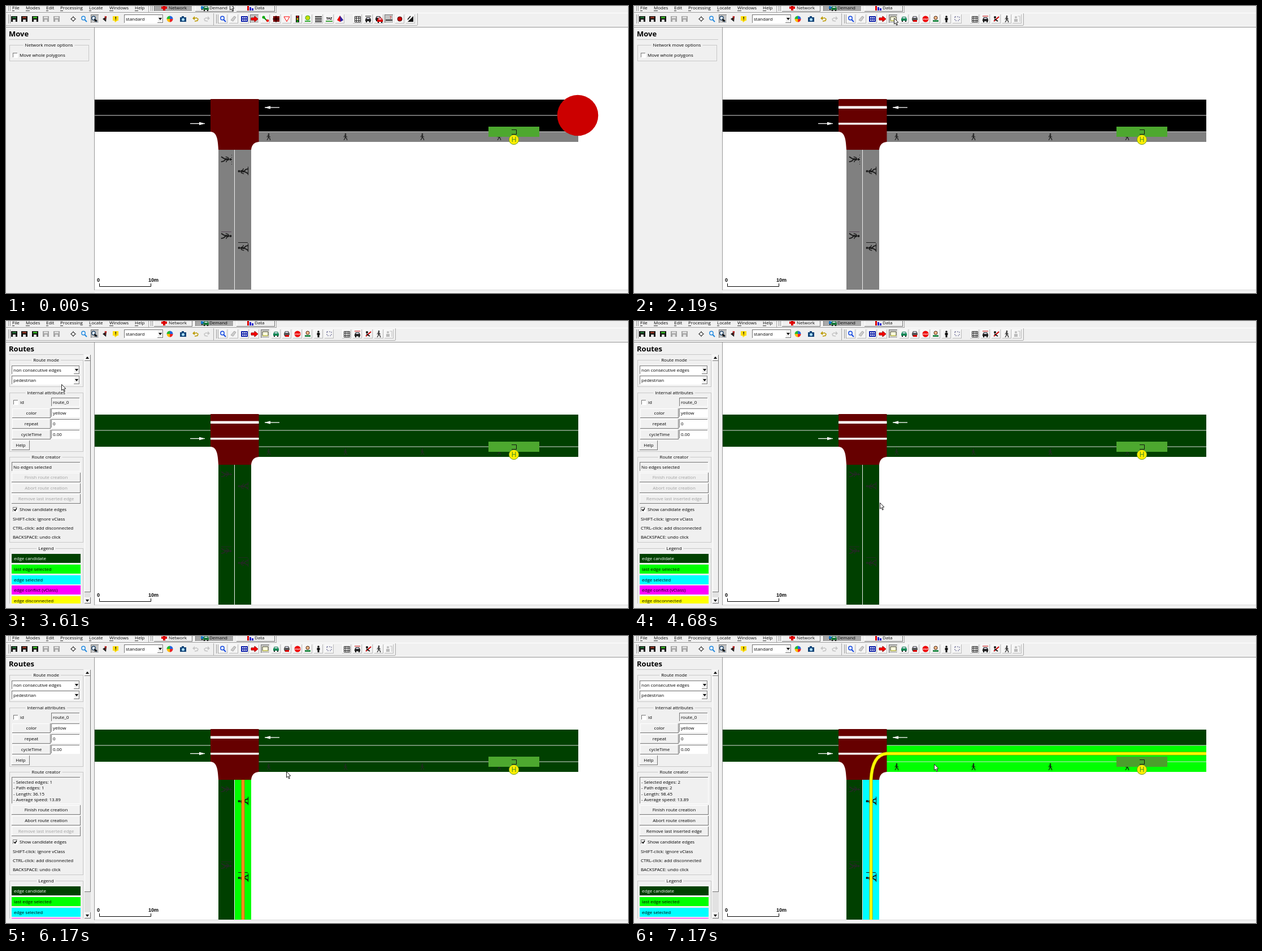
Recreate the animation shown at these times as an HTML page with a canvas. Size 1101 by 509 pixels, loop 8 s.

```html
<!DOCTYPE html>
<html lang="en">
<head>
<meta charset="utf-8">
<title>Route creation</title>
<style>
html, body { margin: 0; height: 100%; overflow: hidden; background: #f0f0f0; }
canvas { display: block; }
</style>
</head>
<body>
<canvas id="stage" width="1101" height="509"></canvas>
<script>
const g = document.getElementById('stage').getContext('2d');
const SANS = '"Open Sans", "Noto Sans", sans-serif';
const LIME = '#00ff00', DARK = '#004000', GREY = '#f0f0f0';

// Moments when the interface switches state
const AT = { press: 780, demand: 950, redraw: 1040, routeButton: 2190, routes: 2350,
  panel: 2450, click1: 5160, edge1: 5230, click1End: 5330, click2: 6790, edge2: 6850, click2End: 7170 };

// Pointer moves: start, end, steps, evenly timed waypoints
const moves = [
  [320, 620, 5, [[396, -4], [369, 6]]],
  [1410, 2030, 9, [[369, 6], [426, 11], [466, 16], [487, 19], [492, 20], [490, 20], [481, 21], [470, 21], [463, 21], [460, 21]]],
  [2450, 2980, 8, [[460, 21], [320, 52], [145, 92], [99, 96]]],
  [3150, 3230, 2, [[99, 96], [99, 111]]],
  [3610, 3610, 1, [[99, 111], [98, 112]]],
  [3850, 4620, 11, [[98, 112], [54, 103], [150, 170], [310, 270], [405, 318], [436, 322]]],
  [4680, 4680, 1, [[436, 322], [435, 322]]],
  [4830, 5010, 3, [[435, 322], [424, 349]]],
  [5690, 6490, 11, [[424, 349], [455, 301], [500, 234], [523, 228]]],
  [6550, 6550, 1, [[523, 228], [526, 226]]],
  [6710, 6710, 1, [[526, 226], [531, 227]]]
];

function rect(x, y, w, h, color) { g.fillStyle = color; g.fillRect(x, y, w, h); }
function trace(points, close) {
  g.beginPath();
  for (let i = 0; i < points.length; i += 2) g.lineTo(points[i], points[i + 1]);
  if (close) g.closePath();
}
function line(points, color = '#000', width = 1) {
  trace(points);
  g.strokeStyle = color; g.lineWidth = width; g.stroke();
}
function poly(points, fill, stroke) {
  trace(points, true);
  g.fillStyle = fill; g.fill();
  if (stroke) { g.strokeStyle = stroke; g.lineWidth = 1; g.stroke(); }
}
function circle(x, y, r, fill, stroke, width = 1) {
  g.beginPath(); g.arc(x, y, r, 0, 7);
  if (fill) { g.fillStyle = fill; g.fill(); }
  if (stroke) { g.strokeStyle = stroke; g.lineWidth = width; g.stroke(); }
}
function text(s, x, y, { color = '#000', align = 'left', font = '8px ' + SANS } = {}) {
  g.font = font; g.fillStyle = color; g.textAlign = align;
  g.fillText(s, x, y + 3);
}
function bevel(x, y, w, h, down, fill = down ? '#c4c4c4' : GREY) {
  rect(x, y, w, h, fill);
  const a = down ? '#777' : '#fff', b = down ? '#fff' : '#777';
  rect(x, y, w, 1, a); rect(x, y, 1, h, a);
  rect(x, y + h - 1, w, 1, b); rect(x + w - 1, y, 1, h, b);
}

// ---- toolbar icons, centred on x, 23 ----
function floppy(x, color) {
  rect(x - 5, 18, 11, 10, color ? '#111' : '#a4a4a4');
  rect(x - 3, 19, 7, 3, color || '#ddd');
  rect(x - 2, 24, 5, 4, color ? '#ddd' : '#e4e4e4');
}
function lens(x, color) {
  circle(x - 1, 21.5, 3.2, '#e8f4ff', color, 1.4);
  line([x + 1, 24, x + 5, 28], color, 2);
}
function grid(x, color, w = 10) {
  g.strokeStyle = color; g.lineWidth = 1;
  for (let i = 0; i <= 3; i++) {
    const d = Math.round(i * w / 3);
    line([x - 4.5, 18.5 + d, x + w - 4.5, 18.5 + d], color);
    line([x - 4.5 + d, 18.5, x - 4.5 + d, 18.5 + w], color);
  }
}
function blocks(x, color) {
  rect(x - 6, 18, 12, 10, color);
  for (let i = 0; i < 6; i++) rect(x - 4 + i % 3 * 3, 20 + (i > 2 ? 4 : 0), 2, 2, '#fff');
}
function car(x, color, y = 23) {
  poly([x - 5, y, x - 3, y - 4, x + 3, y - 4, x + 5, y, x + 5, y + 3, x - 5, y + 3], color);
  rect(x - 2.5, y - 3, 5, 2, '#dde');
  rect(x - 4, y + 3, 2, 2, '#111'); rect(x + 2, y + 3, 2, 2, '#111');
}
function curl(x, dir, color) {
  line([x - 2 * dir, 27, x + 3 * dir, 26, x + 4 * dir, 23, x + dir, 21, x - 3 * dir, 22], color, 1.5);
  poly([x - 6 * dir, 22, x - 2 * dir, 18, x - 2 * dir, 25], color);
}
function walker(x, y, size = 1, turn = 0, color = '#1c1c1c') {
  g.save();
  g.translate(x, y); g.rotate(turn); g.scale(size, size);
  circle(0, -4.8, 1.3, color);
  line([0, -3, -.3, 1], color, 2);
  line([-.3, .5, 2, 3, 2.8, 6], color, 1.2);
  line([-.3, .5, -1.2, 3, -3, 5.8], color, 1.2);
  line([-3, .8, -2, -2, 0, -3, 1.5, -.5, 3.2, .3], color, .9);
  g.restore();
}
function redArrow(x) {
  poly([x - 6, 21, x, 21, x, 18, x + 6, 23, x, 28, x, 25, x - 6, 25], '#f00', '#900');
}

const netIcons = {
  459: x => { line([x - 4, 19, x + 4, 27], '#080', 2); circle(x - 3, 20, 2.5, '#0a0'); circle(x + 4, 26, 2.3, '#e00'); },
  478: x => { rect(x - 5, 18, 11, 10, '#700'); line([x - 6, 23, x + 6, 23]); line([x, 17, x, 29]); },
  497: x => poly([x - 5, 19, x + 5, 19, x, 27.5], '#fff', '#f00'),
  516: x => { rect(x - 3, 17, 6, 12, '#222'); ['#f00', '#fd0', '#0c0'].forEach((c, i) => circle(x, 19 + 4 * i, 1.5, c)); },
  534: x => { circle(x, 21, 4, '#cd0', '#3a3'); rect(x - 5, 26, 10, 2, '#3a3'); },
  553: x => [18, 21, 24, 27].forEach(y => rect(x - 6, y, 12, 1.5, '#111')),
  572: x => { text('TAZ', x, 21, { align: 'center', font: 'bold 6px ' + SANS }); line([x - 6, 27, x + 6, 27], '#080', 1.5); },
  591: x => { poly([x, 17, x + 6, 25, x, 28, x - 5, 25], '#e00'); poly([x, 17, x + 6, 25, x + 1, 28], '#22a'); },
  622: x => grid(x, '#222'),
  641: x => { car(x, '#222', 24); line([x - 5, 18, x + 5, 18]); },
  660: x => { car(x - 1, '#222', 22); car(x + 2, '#d00', 25); },
  678: x => { line([x - 6, 25, x + 6, 25], '#111', 1.5); text('?', x + 1, 20, { color: '#d00' }); },
  697: x => circle(x, 23, 4, '#c00', '#400'),
  716: x => { poly([x + 5, 18, x + 5, 28, x - 5, 28], '#111'); line([x - 5, 24, x, 18], '#111', 1.5); }
};
const demandIcons = {
  459: x => { rect(x - 6, 18, 12, 9, '#ffd'); line([x - 5, 26, x - 5, 19, x + 5, 19, x + 5, 26], '#333'); line([x - 5, 26, x + 5, 26], '#990'); },
  478: x => car(x, '#185'),
  497: x => { car(x, '#555', 22); rect(x - 3, 25, 7, 3, '#d00'); },
  516: x => { circle(x, 23, 5.5, '#e00'); text('STOP', x, 22, { align: 'center', color: '#fff', font: 'bold 4px ' + SANS }); },
  534: x => { circle(x, 21, 3, '#fb8', '#421'); rect(x - 5, 25, 10, 3, '#284'); },
  553: x => { circle(x, 19, 1.8, '#111'); rect(x - 2.5, 21, 5, 4, '#111'); rect(x - 1.5, 24, 3, 5, '#111'); },
  572: x => { g.setLineDash([2, 2]); line([x - 4, 19, x + 4, 19, x + 4, 26, x - 4, 26, x - 4, 19], '#558'); g.setLineDash([]); },
  603: x => grid(x, '#222'),
  622: x => { car(x, '#222', 24); line([x - 5, 18, x + 5, 18], '#c00'); },
  641: x => { circle(x - 2, 20, 2, '#111'); line([x - 4, 27, x + 5, 19], '#c00', 2); line([x - 3, 23, x + 3, 27], '#111', 2); },
  660: x => walker(x, 23),
  678: x => { circle(x - 2, 20, 2, '#bbb'); rect(x - 5, 23, 6, 5, '#bbb'); line([x + 1.5, 18, x + 5, 18, x + 5, 28], '#bbb'); }
};

function tab(x, label, labelX, down) {
  bevel(x, -8, 68, 18, down, down ? '#a8a8a8' : GREY);
  text(label, labelX, 3);
}
function grip(x, y, h) { line([x, y, x, y + h], '#999'); line([x + 3, y, x + 3, y + h], '#999'); }

function toolbars(t) {
  const demand = t >= AT.demand, route = t >= AT.routeButton;
  rect(0, 0, 1101, 37, GREY);
  rect(0, 11, 479, 1, '#999'); rect(0, 12, 1101, 1, '#fff');
  rect(0, 34, demand ? 689 : 728, 1, '#aaa');
  rect(0, 36, 1101, 1, '#fff'); rect(0, 37, 1101, 1, '#888');
  grip(4.5, 0, 9); grip(256.5, 0, 9); grip(4.5, 15, 16); grip(372.5, 15, 16);
  [[252, 0, 11], [478, 0, 11], [367, 13, 21], [demand ? 689 : 728, 13, 21]].forEach(([x, y, h]) => rect(x, y, 1, h, '#aaa'));
  [['File', 11, 4], ['Modes', 35, 7], ['Edit', 71, 4], ['Processing', 96, 5], ['Locate', 147, 4], ['Windows', 183, 7], ['Help', 228, 6]]
    .forEach(([s, x, w]) => { text(s, x, 3); rect(x, 8, w, 1, '#333'); });

  tab(262, 'Network', 288, !demand);
  tab(335, 'Demand', 360, t >= AT.press);
  tab(408, 'Data', 440, false);
  rect(278, -2, 4, 10, '#d00'); rect(275, 1, 10, 4, '#d00');
  car(350, '#17c', 2); car(354, '#197a3a', 4);
  rect(427, 0, 3, 8, '#d00'); rect(431, 2, 3, 6, '#22c'); rect(435, 4, 3, 4, '#22c');

  ['#263', '#832', '#3a2', '', ''].forEach((c, i) => floppy(14 + i * 18.75 | 0, c));
  line([114, 23, 124, 23], '#222'); line([119, 18, 119, 28], '#222');
  circle(119, 23, 3, '#fff', '#222');
  lens(138, '#28d');
  bevel(150, 15, 15, 16, true); lens(156, '#246'); poly([156, 22, 162, 26, 157, 28], '#111');
  poly([171, 23, 178, 18, 177, 28], '#222'); text('?', 174, 21, { color: '#d00', font: 'bold 9px ' + SANS });
  rect(189, 18, 10, 8, '#fd0'); poly([192, 26, 197, 26, 193, 29], '#fd0'); rect(193.5, 19, 1.5, 4, '#222'); rect(193.5, 24, 1.5, 1, '#222');
  combo(209, 15, 70, 'standard');
  ['#e22', '#fb0', '#2b3', '#26d'].forEach((c, i) => {
    g.beginPath(); g.moveTo(290, 23); g.arc(290, 23, 5.5, i * Math.PI / 2, (i + 1) * Math.PI / 2);
    g.fillStyle = c; g.fill();
  });
  rect(308, 20, 11, 8, '#147'); rect(311, 18, 4, 2, '#147'); circle(313.5, 24, 2.5, '#adf');
  curl(336, 1, t >= AT.edge1 ? '#c4c4c4' : '#b90'); curl(355, -1, '#c4c4c4');

  const icons = demand ? demandIcons : netIcons;
  const pressed = x => x == (route ? 459 : 440) || !demand && x == 678;
  for (const x of [384, 403, 422, 440, ...Object.keys(icons).map(Number)]) {
    bevel(x - 8, 15, 16, 16, pressed(x), pressed(x) ? '#c4c4c4' : '#f4f4f4');
    if (!pressed(x)) { rect(x - 8, 30, 16, 1, '#bbb'); rect(x + 7, 15, 1, 16, '#bbb'); }
  }
  lens(384, '#14d');
  poly([398, 25, 404, 18, 407, 20, 402, 27], '#ccc', '#aaa');
  blocks(422, '#12a'); redArrow(440);
  for (const x in icons) icons[x](+x);
}

// ---- side panel ----
function combo(x, y, w, label) {
  bevel(x, y, w, 16, true, '#fff');
  text(label, x + 3, y + 8);
  bevel(x + w - 11, y + 1, 10, 14);
  poly([x + w - 9, y + 6, x + w - 3, y + 6, x + w - 6, y + 10], '#000');
}
function group(label, y, bottom, right = 136) {
  g.strokeStyle = '#c8c8c8'; g.lineWidth = 1;
  g.strokeRect(6.5, y + .5, right - 6, bottom - y);
  const mid = (6 + right) / 2;
  g.font = '8px ' + SANS;
  const w = g.measureText(label).width + 6;
  rect(mid - w / 2, y - 5, w, 10, GREY);
  text(label, mid, y, { align: 'center' });
}
function button(label, x, y, w, enabled = true) {
  bevel(x, y - 8, w, 17);
  text(label, x + w / 2, y, { align: 'center', color: enabled ? '#000' : '#a0a0a0' });
}
function checkbox(x, y, label, checked) {
  bevel(x, y - 4, 9, 9, true, '#fff');
  if (checked) line([x + 2, y, x + 4, y + 2.5, x + 7, y - 2], '#000', 1.5);
  text(label, x + 12, y);
}
function field(s, x, y, w, fill = '#fff') { bevel(x, y - 8, w, 16, true, fill); text(s, x + 3, y); }

function routePanel(t) {
  const full = t >= AT.panel, picked = t >= AT.edge1, both = t >= AT.edge2;
  const dy = picked ? 31 : 0;
  group('Route mode', 69, 116);
  combo(10, 79, 121, 'non consecutive edges');
  combo(10, 97, 121, 'pedestrian');
  group('Internal attributes', 127, 231);
  if (full) {
    checkbox(13, 144, 'id');
    field('route_0', 80, 144, 51, GREY);
    [['color', 'yellow'], ['repeat', '0'], ['cycleTime', '0.00']].forEach(([name, value], i) => {
      const y = 163 + Math.round(i * 18.8);
      button(name, 11, y, 68); field(value, 80, y, 51);
    });
  }
  button('Help', 10, 220, 32);
  group('Route creator', 241, 392 + dy);
  bevel(10, 250, 122, 17 + dy, true, GREY);
  const info = picked
    ? ['- Selected edges: ' + (both ? 2 : 1), '- Path edges: ' + (both ? 2 : 1), '- Length: ' + (both ? '98.45' : '36.15'), '- Average speed: 13.89']
    : ['No edges selected'];
  info.forEach((s, i) => text(s, 13, 258.5 + i * 10.6));
  button('Finish route creation', 10, 277 + dy, 122, picked);
  button('Abort route creation', 10, 296 + dy, 122, picked);
  button('Remove last inserted edge', 10, 315 + dy, 122, both);
  checkbox(12, 334 + dy, 'Show candidate edges', true);
  ['SHIFT-click: ignore vClass', 'CTRL-click: add disconnected', 'BACKSPACE: undo click']
    .forEach((s, i) => text(s, 12, 351 + dy + i * 16));

  g.save();
  g.beginPath(); g.rect(0, 380, 138, (full ? 501 : 485) - 380); g.clip();
  group('Legend', 403 + dy, 540);
  [['edge candidate', DARK], ['last edge selected', LIME], ['edge selected', '#0ff'], ['edge conflict (vClass)', '#f0f'], ['edge disconnected', '#ff0']]
    .forEach(([s, color], i) => {
      const y = 421 + dy + Math.round(i * 18.75);
      rect(10, y - 8, 122, 16, color);
      g.save();
      if (!full) { g.beginPath(); g.rect(0, 380, 138, 99); g.clip(); }
      text(s, 14, y, { color: i ? '#000' : '#fff' });
      g.restore();
    });
  g.restore();

  rect(139, 60, 11, 442, '#e2e2e2');
  bevel(139, 60, 11, 11); bevel(139, 490, 11, 11);
  poly([141, 67, 147, 67, 144, 63], '#000'); poly([141, 494, 147, 494, 144, 498], '#000');
  bevel(139, 71, 11, picked ? 383 : 410);
}

function panel(t) {
  const routes = t >= AT.routes;
  rect(0, 38, 157, 471, GREY);
  rect(156, 38, 1, 466, '#999');
  text(routes ? 'Routes' : 'Move', 5, 51, { font: 'bold 13px ' + SANS });
  rect(5, 59, routes ? 132 : 144, 1, '#c8c8c8');
  if (routes) return routePanel(t);
  group('Network move options', 69, 97, 146);
  checkbox(12, 87, 'Move whole polygons');
}

// ---- road network ----
function laneArrow(tip, y, dir) {
  line([tip, y, tip + 26 * dir, y], '#fff', 1.3);
  poly([tip, y, tip + 10 * dir, y - 2.7, tip + 10 * dir, y + 2.7], '#fff');
}
function path(both) {
  g.beginPath(); g.moveTo(419.5, 503); g.lineTo(419.5, 255);
  if (both) { g.bezierCurveTo(421, 226, 430, 210, 447, 208.5); g.lineTo(1013, 208.5); }
  g.lineWidth = 6; g.strokeStyle = both ? '#a89c00' : '#b06a10'; g.stroke();
  g.lineWidth = 4.4; g.strokeStyle = both ? '#ffff00' : '#ff8c1a'; g.stroke();
}
function network(t) {
  const demand = t >= AT.redraw, routes = t >= AT.routes, first = t >= AT.edge1, second = t >= AT.edge2;
  const road = routes ? DARK : '#000', walk = routes ? DARK : '#808080';
  const dim = routes ? '#222a22' : '#1c1c1c', lit = c => c ? '#111' : dim;
  rect(157, 38, 944, 465, '#fff');
  rect(157, 166, 856, 57, road);
  rect(447, 223, 566, 18, walk);
  rect(376, 255, 58, 248, walk);
  if (first) rect(405, 255, 29, 248, second ? '#0ff' : LIME);
  if (second) rect(447, 194, 566, 47, LIME);
  rect(157, 193.5, 856, 1, '#ddd');
  rect(447, 222.5, 566, 1, '#ddd');
  rect(404, 255, 1, 248, '#eee');

  for (let x = 465; x < 900; x += 136) walker(x, 232, 1, 0, lit(second));
  for (const y of [0, 136]) {
    walker(390, 272 + y, 1.55, Math.PI / 2, dim);
    walker(420, 293 + y, 1.55, -Math.PI / 2, lit(first));
    line([428.5, 285 + y, 428.5, 300 + y], lit(first));
  }
  line([381, 400.5, 399, 400.5], routes ? dim : '#5a4a5a');
  line([411, 419.5, 428, 419.5], lit(first));
  g.setLineDash([1, 3]); line([399.5, 264, 399.5, 282], dim); g.setLineDash([]);
  laneArrow(458, 180, 1); laneArrow(352, 208.5, -1);

  rect(854, 214, 90, 18, second ? '#4c9f2c' : '#4da82f');
  line([895, 219.5, 903.5, 219.5, 903.5, 227.5, 895, 227.5], '#111');
  circle(899, 237, 8.6, '#ffee00', '#6a9e20');
  text('H', 899, 237.8, { align: 'center', color: '#3f8f20', font: '12px "Liberation Sans", sans-serif' });

  g.beginPath(); g.moveTo(362, 165); g.lineTo(447.5, 165); g.lineTo(447.5, 241);
  g.bezierCurveTo(439, 242, 435, 246, 434, 255); g.lineTo(376, 255);
  g.bezierCurveTo(375, 235, 373, 224, 362, 223);
  g.fillStyle = '#660000'; g.fill();
  if (demand) { rect(362, 177.5, 85.5, 4.5, '#fff'); rect(362, 207, 85.5, 3.5, '#fff'); }
  else circle(1012, 194, 36.3, '#cc0000');
  if (first) path(second);

  line([165.5, 492, 165.5, 497.5, 256.5, 497.5, 256.5, 492]);
  const bold = { font: 'bold 9px "Liberation Sans", sans-serif' };
  text('0', 161, 486, bold); text('10m', 252, 486, bold);
  rect(0, 503, 1101, 6, GREY); rect(0, 503, 1101, 1, '#ddd'); rect(0, 507, 1101, 2, '#fafafa');
}

// ---- pointer ----
function pointerAt(t) {
  let pos = moves[0][3][0];
  for (const [start, end, steps, points] of moves) {
    if (t < start) break;
    const step = steps > 1 ? Math.min(steps, 1 + Math.floor((t - start) / (end - start) * (steps - 1) + 1e-6)) : 1;
    const u = step / steps * (points.length - 1);
    const i = Math.min(Math.floor(u), points.length - 2);
    pos = points[i].map((v, k) => v + (points[i + 1][k] - v) * (u - i));
  }
  return pos;
}
function pointer(t) {
  const [x, y] = pointerAt(t).map(Math.round);
  if (t >= AT.click1 && t < AT.click1End || t >= AT.click2 && t < AT.click2End) circle(x, y, 8.5, 'rgba(255,255,0,.6)');
  g.save();
  g.translate(x + .5, y + .5);
  poly([0, 0, 0, 10.5, 2.5, 8.5, 4.2, 12.6, 5.8, 12, 4.2, 7.8, 7.3, 7.5], '#fff', '#222');
  g.restore();
}

function frame() {
  const t = performance.now() % 8000;
  network(t);
  panel(t);
  toolbars(t);
  pointer(t);
  requestAnimationFrame(frame);
}
frame();
</script>
</body>
</html>
```
